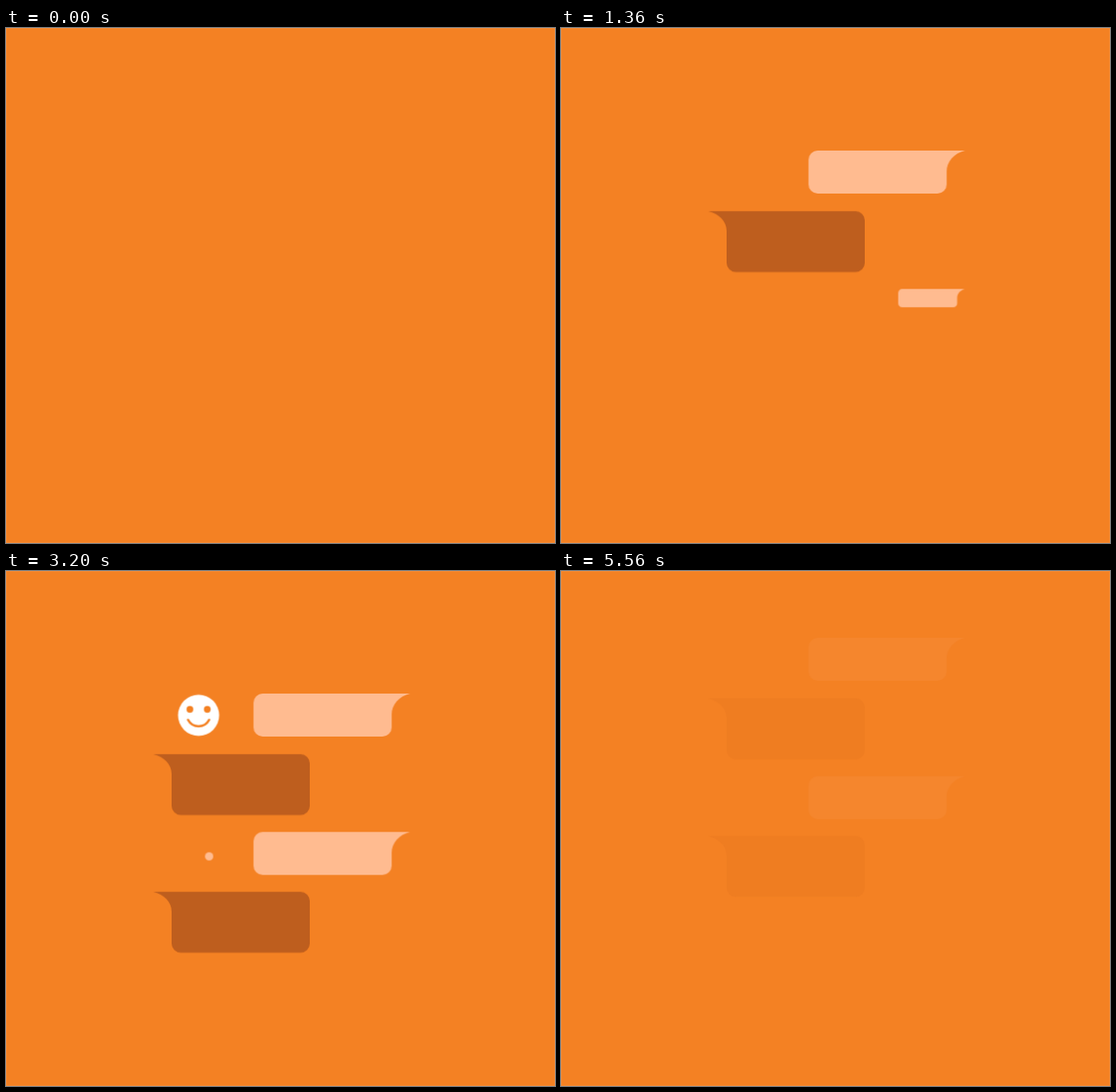
An HTML page for the animation above (5600 ms loop, 600 by 563 pixels).

```html
<!DOCTYPE html>
<html lang="en">
<head>
<meta charset="utf-8">
<title>Chat bubbles</title>
<style>
  :root { --bg: #f48123; --light: #ffbb90; --dark: #be5e1e; --loop: 5.6s; --ease: cubic-bezier(.3333, 0, .6667, 1); }
  html, body { margin: 0; width: 100%; height: 100%; overflow: hidden; background: var(--bg); }
  body { box-shadow: inset 0 0 0 1px rgba(255, 255, 255, .08); }
  svg { display: block; width: 600px; height: 563px; }

  .chat { animation: rise var(--loop) var(--ease) infinite, fade var(--loop) linear infinite; }
  @keyframes rise { 0%, 92.857% { transform: none } 100% { transform: translateY(-62.7px) } }
  @keyframes fade { 0%, 92.857% { opacity: 1 } 100% { opacity: 0 } }

  /* Bubbles grow from the tail tip, overshoot and settle, 600 ms apart. */
  .bubble { animation: var(--loop) var(--ease) infinite; }
  .light, .dot { fill: var(--light); }
  .dark { fill: var(--dark); }
  .b1 { animation-name: pop1; }
  .b2 { animation-name: pop2; }
  .b3 { animation-name: pop3; }
  .b4 { animation-name: pop4; }
  @keyframes pop1 { 0% { transform: scale(0) } 7.143% { transform: scale(1.2) } 10.714%, 100% { transform: scale(1) } }
  @keyframes pop2 { 0%, 10.714% { transform: scale(0) } 17.857% { transform: scale(1.2) } 21.429%, 100% { transform: scale(1) } }
  @keyframes pop3 { 0%, 21.429% { transform: scale(0) } 28.571% { transform: scale(1.2) } 32.143%, 100% { transform: scale(1) } }
  @keyframes pop4 { 0%, 32.143% { transform: scale(0) } 39.286% { transform: scale(1.2) } 42.857%, 100% { transform: scale(1) } }

  /* Reactions grow, stay briefly and shrink. */
  .peek { animation: peek var(--loop) var(--ease) var(--at) infinite backwards; }
  @keyframes peek {
    0% { transform: scale(0) }
    7.143%, 10.714% { transform: scale(1) }
    17.857%, 100% { transform: scale(0) }
  }
  .hole { fill: var(--bg); }
  .white { fill: #fff; }
  .line { fill: none; stroke-linecap: round; }
</style>
</head>
<body>
<svg viewBox="0 0 600 563">
  <defs>
    <path id="short" d="M0 0C-12 3 -20 12 -20 23V37a10 10 0 0 1 -10 10H-161a10 10 0 0 1 -10 -10V10a10 10 0 0 1 10 -10Z"/>
    <path id="tall" d="M0 0C11.500 3 20 10.500 20 21.500V56.500a10 10 0 0 0 10 10H161a10 10 0 0 0 10 -10V10a10 10 0 0 0 -10 -10Z"/>
    <g id="smiley">
      <circle class="white" r="22.500"/>
      <circle class="hole" cx="-9.500" cy="-6.500" r="3.700"/>
      <circle class="hole" cx="9.500" cy="-6.500" r="3.700"/>
      <path class="line" stroke="#f48123" stroke-width="2.600" d="M-11.500 5A13 13 0 0 0 11.500 5"/>
    </g>
    <g id="hand">
      <path class="line" stroke="#fff" stroke-width="6" d="M1 -21.500L9 -9M-7.500 -15L4 -5M12.700 -19.500V4"/>
      <path class="white" d="M-15.700 3C-15.500 -2.500 -12 -5.500 -7 -5.500C-2 -5.500 0 -3 2 -6L8 -12H15.700V9A15.500 16 0 0 1 .5 25C-8 25 -14.500 19 -15.500 11Q-15.700 7 -12 6.500Z"/>
      <circle class="hole" cx="-5" cy="7" r="5.700"/>
      <path class="line" stroke="#f48123" stroke-width="1.800" d="M-8 5.500L-16 5.800"/>
    </g>
  </defs>
  <g class="chat">
    <g transform="translate(441.500 134)"><use class="bubble light b1" href="#short"/></g>
    <g transform="translate(161 200.300)"><use class="bubble dark b2" href="#tall"/></g>
    <g transform="translate(441.500 285.300)"><use class="bubble light b3" href="#short"/></g>
    <g transform="translate(161 350.700)"><use class="bubble dark b4" href="#tall"/></g>

    <g transform="translate(210.500 157.700)"><use class="peek" style="--at: 2.8s" href="#smiley"/></g>
    <g transform="translate(222 312)"><circle class="peek dot" style="--at: 3s" r="9"/></g>
    <g transform="translate(412.500 386)"><use class="peek" style="--at: 3.4s" href="#smiley"/></g>
    <g transform="translate(219 159)"><circle class="peek dot" style="--at: 3.6s" r="9"/></g>
    <g transform="translate(391 233)"><use class="peek" style="--at: 4s" href="#hand"/></g>
    <g transform="translate(382 384)"><circle class="peek dot" style="--at: 4.2s" r="9"/></g>
  </g>
</svg>
</body>
</html>
```
